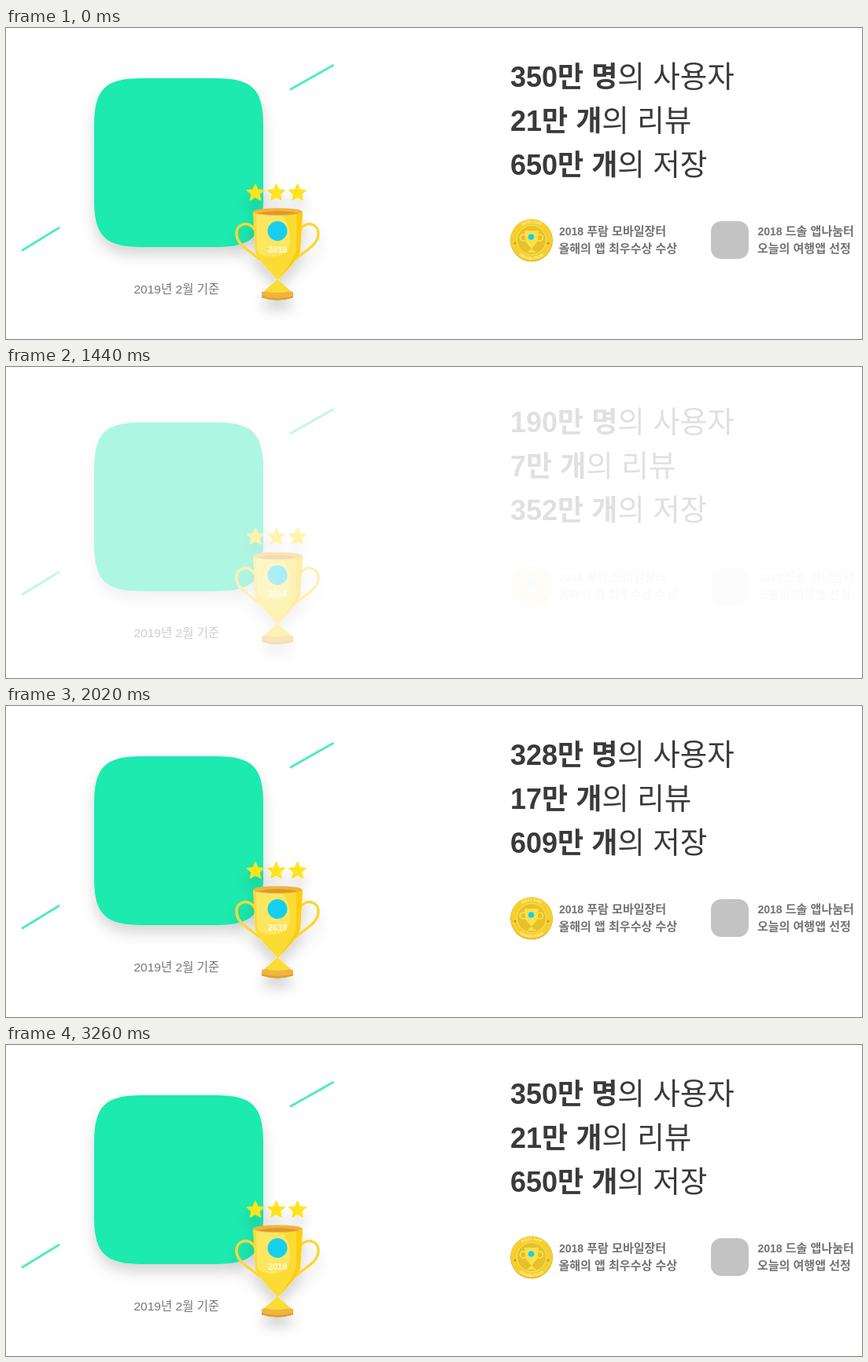
Animation, 1088 px wide and 396 px high, one loop 3.28 s. Source, as an HTML page:

```html
<!DOCTYPE html>
<html lang="ko">
<head>
<meta charset="utf-8">
<title>여행 앱 소개</title>
<style>
  html, body { margin: 0; width: 100%; height: 100%; overflow: hidden; background: #fff; }
  svg { display: block; width: 1088px; height: 396px; }
  text { font-family: "Liberation Sans", "Noto Sans CJK KR", "Noto Sans CJK", sans-serif; }
  .headline { font-size: 36px; font-weight: 700; fill: #3a3a3a; }
  .light { font-size: 37.5px; font-weight: 300; }
  .award { font-size: 15px; font-weight: 700; fill: #727272; }
  .year { font-size: 14px; }
  .caption { font-size: 15.5px; fill: #777; }
  .engraving { font-size: 5px; font-weight: 700; fill: #fff3a0; text-anchor: middle; }
</style>
</head>
<body>
<svg viewBox="0 0 1088 396" xml:space="preserve">
  <defs>
    <filter id="tileShadow" x="-30%" y="-30%" width="160%" height="160%">
      <feDropShadow dx="0" dy="10" stdDeviation="9" flood-opacity=".16"/>
    </filter>
    <filter id="cupShadow" x="-40%" y="-30%" width="180%" height="170%">
      <feDropShadow dx="0" dy="13" stdDeviation="8" flood-opacity=".16"/>
    </filter>
    <path id="star" fill="#ffe31c" stroke="#ffe31c" stroke-width="1.600" stroke-linejoin="round"/>
    <path id="ringTop" d="M646.5 270a21.5 21.5 0 0 1 43 0"/>
    <path id="ringBottom" d="M643 270a25 25 0 0 0 50 0"/>
  </defs>

  <g id="graphic">
    <path d="M20 283.500L68 254M361 78.500L416.500 47" stroke="#4deac0" stroke-width="2.800"/>
    <path d="M172 64H267C313 64 327 78 327 124V219C327 265 313 279 267 279H172C126 279 112 265 112 219V124C112 78 126 64 172 64Z"
      fill="#1feaaf" filter="url(#tileShadow)"/>

    <g filter="url(#cupShadow)">
      <use href="#star" x="317" y="210"/>
      <use href="#star" x="343.500" y="210"/>
      <use href="#star" x="370.500" y="210"/>
      <g fill="none" stroke="#fbd636" stroke-width="3.500">
        <path d="M316 257C311 246 293 247 293 262C293 276 309 283 323 295"/>
        <path d="M374 257C379 246 397 247 397 262C397 276 381 283 367 295"/>
      </g>
      <path d="M314 234L316.500 283Q317.500 293 345.500 321Q373 293 374 283L377 234Z" fill="#fbdc34"/>
      <path d="M369 236H377L374 283Q373 293 345.500 321Q368 293 369 281Z" fill="#fdce0d"/>
      <path d="M318 237H350Q363 250 361 275Q357 290 339 291Q320 291 319 280Z" fill="#ffed78" opacity=".65"/>
      <ellipse cx="345.500" cy="234" rx="31.500" ry="4.800" fill="#f3b43c"/>
      <path d="M318 236Q345 230 373 236Q345 240 318 236Z" fill="#dc9a2d"/>
      <circle cx="345" cy="258.500" r="12.500" fill="#13cfee"/>
      <text x="333" y="286" font-size="11" font-weight="700" fill="#fffbe0">2018</text>
      <path d="M325 336Q345 330 365 336V343Q345 350 325 343Z" fill="#f2b43c"/>
      <path d="M325 341Q345 347 365 341V343.500Q345 350 325 343.500Z" fill="#dfa132"/>
      <path d="M328 335L345 320L362 335Q345 339 328 335Z" fill="#fbdc34"/>
    </g>

    <text class="caption" x="162.500" y="337.500">2019년 2월 기준</text>
  </g>

  <g id="headlines">
    <text class="headline" x="641" y="75"><tspan class="count"></tspan>만 명<tspan class="light">의 사용자</tspan></text>
    <text class="headline" x="641" y="131"><tspan class="count"></tspan>만 개<tspan class="light">의 리뷰</tspan></text>
    <text class="headline" x="641" y="187"><tspan class="count"></tspan>만 개<tspan class="light">의 저장</tspan></text>
  </g>

  <g id="awards">
    <circle cx="668" cy="270.500" r="27" fill="#d9a91f"/>
    <circle cx="668" cy="270" r="26.500" fill="#f6cf2d"/>
    <circle cx="668" cy="270" r="18.500" fill="#e8c02a" stroke="#f9e26a"/>
    <text class="engraving"><textPath href="#ringTop" startOffset="50%">BEST APP</textPath></text>
    <text class="engraving"><textPath href="#ringBottom" startOffset="50%">GRAND PRIZE</textPath></text>
    <g fill="#c79a1c"><circle cx="647" cy="274" r="1.500"/><circle cx="689" cy="274" r="1.500"/></g>
    <g fill="none" stroke="#f9e04e" stroke-width="1.800">
      <circle cx="657.500" cy="267" r="4"/><circle cx="678.500" cy="267" r="4"/>
    </g>
    <path d="M659 258H677L675.500 272L668 281L674 286H662L668 281L660.500 272Z" fill="#fbe04a"/>
    <circle cx="667.500" cy="266" r="3.800" fill="#13cfee"/>
    <text class="award" x="703" y="263.500"><tspan class="year">2018</tspan> 푸람 모바일장터</text>
    <text class="award" x="702.500" y="285.500">올해의 앱 최우수상 수상</text>

    <rect x="896" y="246" width="48" height="48" rx="13" fill="#c3c3c3"/>
    <text class="award" x="955.500" y="263.500"><tspan class="year">2018</tspan> 드솔 앱나눔터</text>
    <text class="award" x="955" y="285.500">오늘의 여행앱 선정</text>
  </g>
</svg>
<script>
  const LOOP = 3280, STEP = 20, RESET = 1060, FADE = 700, COUNT = 1800, RISE = 10;
  const reveals = [['graphic', 1150], ['headlines', 1250], ['awards', 1350]]
    .map(([id, start]) => ({ node: document.getElementById(id), start }));
  const countNodes = document.querySelectorAll('.count');
  const counters = [
    { total: 350, start: 1120, power: 4 },
    { total: 21, start: 1200, power: 3 },
    { total: 650, start: 1120, power: 4 }
  ];

  const clamp = v => Math.min(1, Math.max(0, v));
  const bezier = (a, b, s) => 3 * (1 - s) ** 2 * s * a + 3 * (1 - s) * s * s * b + s ** 3;

  // cubic-bezier(.42, 0, .58, 1), solved by bisection
  function easeInOut(u) {
    if (u <= 0 || u >= 1) return clamp(u);
    let low = 0, high = 1;
    for (let i = 0; i < 20; i++) {
      const mid = (low + high) / 2;
      if (bezier(.42, .58, mid) < u) low = mid; else high = mid;
    }
    return bezier(0, 1, low);
  }

  function starPath(outer, inner) {
    const points = Array.from({ length: 10 }, (_, i) => {
      const r = i % 2 ? inner : outer, a = i * Math.PI / 5 - Math.PI / 2;
      return `${(r * Math.cos(a)).toFixed(2)} ${(r * Math.sin(a)).toFixed(2)}`;
    });
    return `M${points.join('L')}Z`;
  }

  function render(t) {
    const settled = t < RESET;
    for (const { node, start } of reveals) {
      const p = settled ? 1 : easeInOut((t - start) / FADE);
      node.setAttribute('opacity', p);
      node.setAttribute('transform', `translate(0 ${RISE * (1 - p)})`);
    }
    counters.forEach(({ total, start, power }, i) => {
      const p = settled ? 1 : 1 - (1 - clamp((t - start) / COUNT)) ** power;
      countNodes[i].textContent = Math.floor(total * p);
    });
  }

  document.getElementById('star').setAttribute('d', starPath(11, 5));
  const began = performance.now();
  function tick() {
    const elapsed = Math.round((performance.now() - began) / STEP) * STEP;
    render(elapsed % LOOP);
    requestAnimationFrame(tick);
  }
  tick();
</script>
</body>
</html>
```
